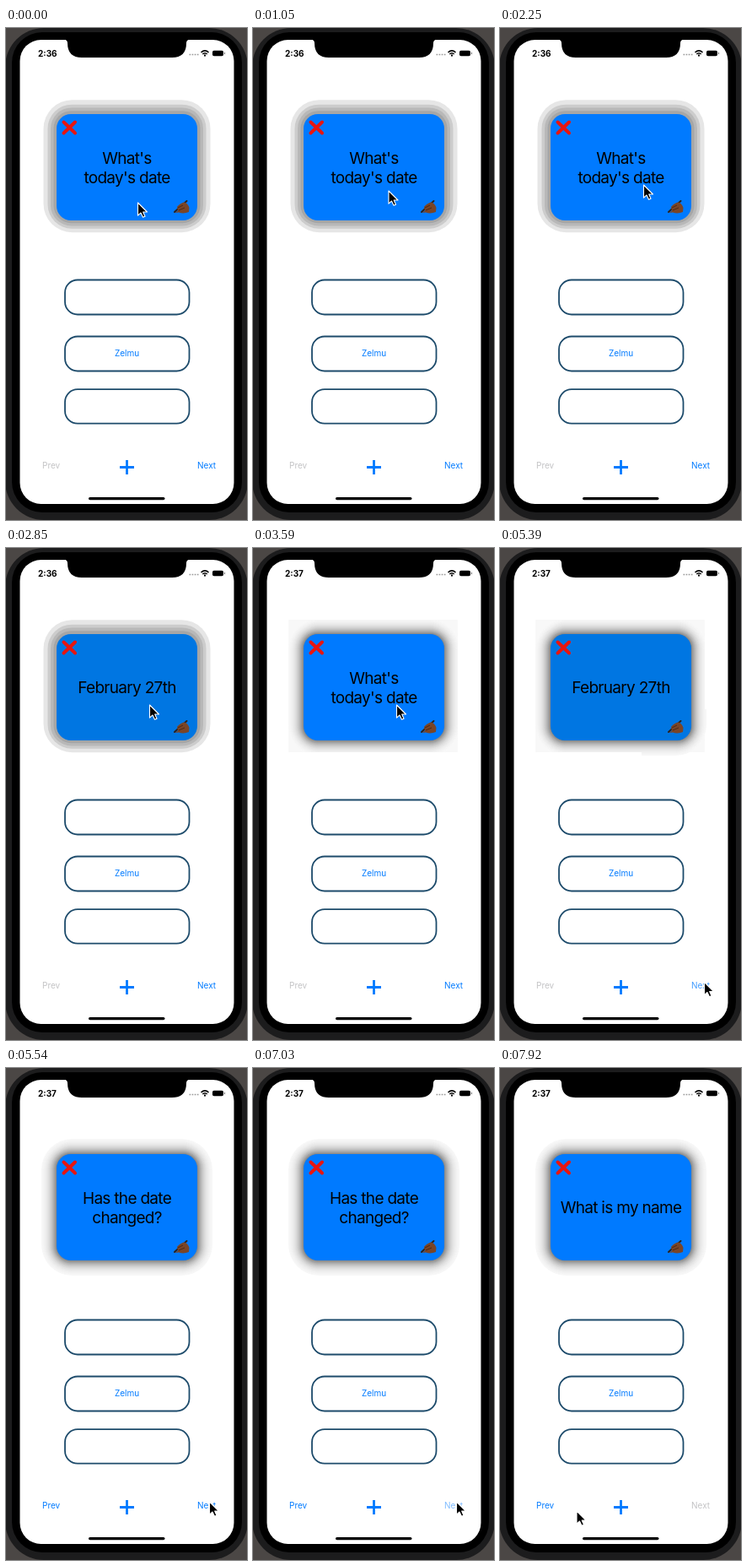
Recreate the animation shown at these times as an HTML page. Size 286 px wide and 583 px high, loop 8000 ms.

```html
<!DOCTYPE html>
<html lang="en">
<head>
<meta charset="utf-8">
<title>Flashcards</title>
<style>
  html, body { margin: 0; width: 100%; height: 100%; overflow: hidden; background: #4b4745; }
  svg { display: block; width: 286px; height: 583px; font: 10px Inter, "Open Sans", sans-serif; }
  .question { font-size: 19px; letter-spacing: -.7px; text-anchor: middle; }
  .button { fill: #fff; stroke: #1d4b6b; stroke-width: 1.8; }
  .blue { fill: #007aff; }
</style>
</head>
<body>
<svg viewBox="0 0 286 583">
  <defs><clipPath id="clip"><path id="clipShape"/></clipPath></defs>

  <!-- phone -->
  <rect width="286" height="583" fill="#4b4745"/>
  <rect x="-1" y="0" width="288" height="583" rx="46" fill="#1c1c1d"/>
  <rect x="7" y="5" width="273" height="569" rx="36"/>
  <rect x="16.5" y="14" width="254" height="550" rx="25" fill="#fff"/>
  <path d="M69 13.5Q73 14 73 18Q73 35 90 35H197Q214 35 214 18Q214 14 218 13.5Z"/>
  <rect x="98" y="556" width="90.500" height="3.200" rx="1.600"/>

  <!-- status bar -->
  <text id="clock" x="38" y="33.500" font-weight="700"></text>
  <path d="M217.500 31.500H229" stroke="#999" stroke-width="1.600" stroke-dasharray="1.700 1.400"/>
  <g fill="none" stroke="#000" stroke-width="1.600">
    <path d="M231.500 29Q236 24.800 240.500 29M233.300 31Q236 28.500 238.700 31"/>
    <path d="M236 31.500V33.500" stroke-width="2"/>
  </g>
  <rect x="245" y="26.800" width="13" height="6.400" rx="1.800"/>
  <path d="M259.500 28.800V31.200" stroke="#777"/>

  <!-- card -->
  <g id="hardShadow"></g>
  <g id="softShadow" clip-path="url(#clip)">
    <rect id="haze" x="42" y="85" width="201" height="157" fill="#f8f8f8"/>
  </g>
  <rect id="card" x="60" y="102" width="167" height="126" rx="17"/>
  <path d="M68.500 111.500L82 124.500M82 111.500L68.500 124.500" stroke="#e8150f" stroke-width="4" stroke-linecap="round"/>
  <path d="M200 218L214.500 205" stroke="#2a211e" stroke-width="2" stroke-linecap="round"/>
  <path d="M203 212Q207 207 212 206.500Q216 208 217.500 213L217 218Q211 220.500 205 218.500L200.500 219L204 216.500Z" fill="#7a4527"/>
  <path d="M204 213L210 210M205 216L212 213" stroke="#4c2816" stroke-width="1" fill="none"/>
  <text id="line1" class="question" x="143.500"></text>
  <text id="line2" class="question" x="143.500" y="183.500"></text>

  <!-- answers and navigation -->
  <rect class="button" x="70" y="298.500" width="147.500" height="41" rx="15"/>
  <rect class="button" x="70" y="365.500" width="147.500" height="41" rx="15"/>
  <rect class="button" x="70" y="428.200" width="147.500" height="40.500" rx="15"/>
  <text class="blue" x="143.500" y="389" text-anchor="middle">Zelmu</text>
  <text id="prev" x="43" y="521.700">Prev</text>
  <text id="next" x="227" y="521.700">Next</text>
  <path d="M135 520.500H152M143.500 512V529" stroke="#007aff" stroke-width="2.800"/>

  <path id="cursor" d="M0 0V15.200L3.500 12L6 17.300L8.500 16.200L6.200 11H11Z" stroke="#fff" stroke-width="1.100" stroke-linejoin="round"/>
</svg>
<script>
const LOOP = 8000;
const BLUE = '#007aff', PRESSED_BLUE = '#0076e2', GRAY = '#c3c3c5';
const el = id => document.getElementById(id);
const set = (id, attrs) => {
  for (const name in attrs) el(id).setAttribute(name, attrs[name]);
};

function addRing(group, spread, shade, dy = 0) {
  const ring = document.createElementNS('http://www.w3.org/2000/svg', 'rect');
  const attrs = {
    x: 60 - spread, y: 102 - spread + dy, rx: 17 + spread * 1.1,
    width: 167 + 2 * spread, height: 126 + 2 * spread, fill: `rgb(${shade},${shade},${shade})`
  };
  for (const name in attrs) ring.setAttribute(name, attrs[name]);
  el(group).append(ring);
}
for (const [spread, shade] of [[15.5, 230], [10.5, 204], [7, 184], [3.5, 166]]) {
  addRing('hardShadow', spread, shade, -spread / 12);
}
for (let spread = 18; spread >= 0; spread--) {
  addRing('softShadow', spread, Math.round(255 - 255 / (1 + Math.exp(spread / 5.2))));
}

// Each entry holds from its start time until the next one.
const questions = [
  [0, "What's", "today's date"],
  [2850, 'February 27th'],
  [3590, "What's", "today's date"],
  [4340, 'February 27th'],
  [5540, 'Has the date', 'changed?'],
  [7330, 'What is my name']
];
const cursorPath = [
  [0, 156.5, 207], [600, 157, 203], [750, 159, 197], [900, 161, 194], [1050, 161, 193],
  [1800, 163, 191], [1950, 166, 189], [2100, 169, 187], [2250, 170.5, 186],
  [4490, 178, 215], [4640, 208, 318], [4790, 240, 440], [4940, 251, 506], [5090, 242.5, 514.5],
  [5540, 241.5, 514],
  [7480, 222, 530], [7630, 165, 537], [7780, 112, 533], [7920, 91, 525]
];
const current = (track, t) => track.findLast(step => step[0] <= t);
const within = (t, from, to) => t >= from && t < to;

function draw(t) {
  const [, first, second = ''] = current(questions, t);
  el('line1').textContent = first;
  el('line2').textContent = second;
  set('line1', { y: second ? 160.5 : 172 });
  const flipped = within(t, 2850, 3590) || within(t, 4340, 5540);
  set('card', { fill: flipped ? PRESSED_BLUE : BLUE });

  const soft = t >= 3590, settled = t >= 5540;
  set('hardShadow', { visibility: soft ? 'hidden' : 'visible' });
  set('softShadow', { visibility: soft ? 'visible' : 'hidden' });
  set('haze', { fill: settled ? 'none' : '#f8f8f8' });
  const lowerCorner = t >= 4640 ? 'M168 191H250V250H168Z' : '';
  set('clipShape', { d: settled ? 'M0 0H286V583H0Z' : 'M42 85H243V242H42Z' + lowerCorner });

  el('clock').textContent = t < 3140 ? '2:36' : '2:37';
  set('prev', { fill: settled ? BLUE : GRAY });
  const nextOpacity = within(t, 5390, 5540) ? 0.75 : within(t, 7030, 7330) ? 0.5 : 1;
  set('next', { fill: t >= 7330 ? GRAY : BLUE, opacity: nextOpacity });

  const [, x, y] = current(cursorPath, t);
  set('cursor', { transform: `translate(${x} ${y})` });
}

function frame() {
  draw(performance.now() % LOOP);
  requestAnimationFrame(frame);
}
frame();
</script>
</body>
</html>
```
